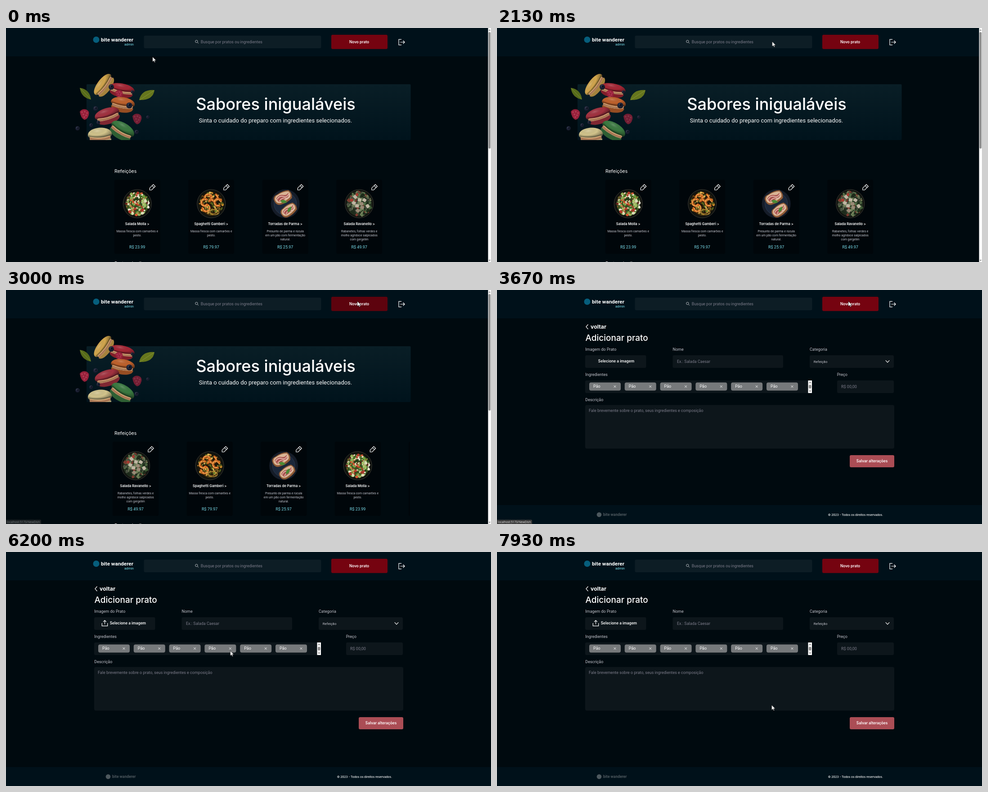
These frames come from a looping animation (1078x520 px, 8 s). An HTML page:

```html
<!DOCTYPE html>
<html lang="pt-BR">
<head>
<meta charset="utf-8">
<title>Novo prato</title>
<style>
  html, body { margin: 0; width: 100%; height: 100%; overflow: hidden; background: #000a0f; }
  svg { display: block; width: 1078px; height: 520px; font-family: Roboto, sans-serif; }
  .pop { font-family: Inter, sans-serif; font-weight: 500; fill: #fff; }
  .semi { font-weight: 600; }
  .mid { text-anchor: middle; }
  .line { fill: none; stroke: #fff; stroke-width: 1.2; }
  .label { font-size: 9px; fill: #c4c4cc; }
  .hint { font-size: 9px; fill: #7c7c8a; }
  .field { fill: #0d161b; }
  .bar { fill: #00111a; }
  .desc { font-size: 6.75px; fill: #c4c4cc; }
  .price { font-size: 9px; fill: #7ce0ee; }

  .a { animation: 8s step-end infinite; }
  .home { animation-name: home; }
  .form { animation-name: form; }
  .bare { animation-name: bare; }
  .icon { animation-name: icon; }
  .new { fill: #750310; animation-name: new; }
  .save { fill: #ab4d55; animation-name: save; }
  .status { animation: status 8s linear infinite; }
  .track { animation: track 8s linear infinite; }
  .cursor { animation: cursor 8s linear infinite; }

  @keyframes home { 0% { visibility: visible } 45.875%, 100% { visibility: hidden } }
  @keyframes form { 0% { visibility: hidden } 45.875%, 100% { visibility: visible } }
  @keyframes bare { 0% { opacity: 1 } 46.7%, 100% { opacity: 0 } }
  @keyframes icon { 0% { opacity: 0 } 46.7%, 100% { opacity: 1 } }
  @keyframes new {
    0% { fill: #750310 } 31.6% { fill: #5d030e } 45.875% { fill: #750310 }
    53.375% { fill: #5d030e } 54.5%, 100% { fill: #750310 }
  }
  @keyframes save { 0% { fill: #ab4d55 } 85.875% { fill: #9b444c } 96.6%, 100% { fill: #ab4d55 } }
  @keyframes status {
    0%, 35% { opacity: 0 } 37.5%, 44.12% { opacity: .5 }
    44.125%, 53.37% { opacity: 1 } 54.2%, 100% { opacity: 0 }
  }
  @keyframes track {
    0% { transform: translateX(-493.5px) }
    33.375% { transform: translateX(-493.5px); animation-timing-function: cubic-bezier(.25, 1, .5, 1) }
    39%, 100% { transform: none }
  }
  @keyframes cursor {
    0%, .875% { transform: translate(325.7px, 64px); animation-timing-function: ease-in-out }
    10.875%, 11.6% { transform: translate(519px, 30px); animation-timing-function: ease-in-out }
    15% { transform: translate(474px, 29px) }
    17.5%, 22.5% { transform: translate(491px, 30px); animation-timing-function: ease-in }
    26.625% { transform: translate(611px, 30px); animation-timing-function: ease-out }
    32.5%, 53.375% { transform: translate(781px, 25px); animation-timing-function: ease-in-out }
    62.5% { transform: translate(430px, 128px) }
    63.4% { transform: translate(428px, 130px); animation-timing-function: ease-in-out }
    74.1% { transform: translate(480px, 208px) }
    77.5% { transform: translate(498.5px, 219.5px); animation-timing-function: ease-in-out }
    85%, 86% { transform: translate(858px, 389px); animation-timing-function: ease-in-out }
    95.9% { transform: translate(795px, 379px) }
    99.125%, 100% { transform: translate(610.5px, 340px) }
  }
</style>
</head>
<body>
<svg viewBox="0 0 1078 520">
  <defs>
    <linearGradient id="banner" x2="0" y2="1">
      <stop stop-color="#091e26"/><stop offset="1" stop-color="#00131c"/>
    </linearGradient>
    <radialGradient id="shade" cx=".4" cy=".3" r=".75">
      <stop stop-color="#fff" stop-opacity=".2"/><stop offset=".5" stop-color="#000" stop-opacity="0"/>
      <stop offset="1" stop-color="#000" stop-opacity=".45"/>
    </radialGradient>
    <clipPath id="rail"><path d="M180 330H897.5V510H180Z"/></clipPath>
    <clipPath id="hero"><path d="M140 90H350V249H140Z"/></clipPath>
    <g id="macaron">
      <path d="M-25-5H25L24 7H-24Z" fill="#d8a878"/>
      <path d="M-24 0Q0 6 24 0V4Q0 9-24 4Z" fill="#4a1a16" opacity=".35"/>
      <path d="M-26 4Q0 10 26 4C27 19-27 19-26 4Z" fill="currentColor"/>
      <path d="M-26 4Q0 10 26 4C27 19-27 19-26 4Z" fill="#000" opacity=".22"/>
      <path d="M-28-3C-30-20 30-20 28-3Q26 1 22-1Q0 4-22-1Q-26 1-28-3Z" fill="currentColor"/>
      <path d="M-28-3C-30-20 30-20 28-3Q26 1 22-1Q0 4-22-1Q-26 1-28-3Z" fill="url(#shade)"/>
      <path d="M-27-3Q0 2 27-3" fill="none" stroke="#000" stroke-opacity=".25" stroke-width="1.5"/>
    </g>
    <g id="berry"><circle r="6" fill="#1d2338"/><circle r="6" fill="url(#shade)"/><circle cx="1" cy="-1" r="2" fill="#0b0e18"/></g>
    <g id="rasp">
      <path d="M-10-6Q-5-13 4-11Q12-8 10 1Q7 12 0 12Q-8 8-10-6Z" fill="#96203a"/>
      <g fill="#c24a60" opacity=".6"><circle cx="-5" cy="-5" r="2"/><circle cx="1" cy="-6" r="2"/><circle cx="6" cy="-3" r="2"/><circle cx="-2" r="2"/><circle cx="4" cy="2" r="2"/><circle cy="6" r="2"/></g>
    </g>
    <path id="pencil" class="line" d="M-6 1.7V6H-1.7L6.3-2L2-6.3ZM-.6-3.7L3.7 .6"/>
  </defs>

  <rect width="1078" height="520" fill="#000a0f"/>

  <g class="a home">
    <rect x="179" y="125" width="720.5" height="124" rx="2" fill="url(#banner)"/>
    <g clip-path="url(#hero)">
      <path d="M164 133Q186 136 189 159Q167 155 164 133Z" fill="#566a1a"/>
      <path d="M296 160Q301 136 330 138Q327 161 296 160Z" fill="#66761d"/>
      <path d="M165 134L188 158M297 160L329 139" stroke="#93a046" stroke-width=".7"/>
      <use href="#macaron" transform="translate(218.5 128) rotate(-53)" color="#d3a74e"/>
      <use href="#macaron" transform="translate(257 139) rotate(11)" color="#a52735"/>
      <use href="#rasp" transform="translate(251 147) scale(.8)"/>
      <use href="#macaron" transform="translate(259 171) rotate(9) scale(.95 1.1)" color="#c0622c"/>
      <use href="#macaron" transform="translate(226 196) rotate(-17) scale(1 1.15)" color="#a23240"/>
      <use href="#macaron" transform="translate(257 229) rotate(30) scale(1 1.2)" color="#3b7a41"/>
      <use href="#macaron" transform="translate(209 242) rotate(-4) scale(.95 1.3)" color="#d2c48c"/>
      <use href="#rasp" transform="translate(174 192)"/>
      <use href="#rasp" transform="translate(291 202)" opacity=".75"/>
      <g id="berries"></g>
    </g>
    <text class="pop mid" x="599.5" y="182" font-size="36.1">Sabores inigualáveis</text>
    <text class="mid" x="599" y="210" font-size="12.95" fill="#fff">Sinta o cuidado do preparo com ingredientes selecionados.</text>
    <text class="pop" x="241" y="321.5" font-size="10.6" style="font-weight:400">Refeições</text>
    <g clip-path="url(#rail)"><g class="track" id="cards"></g></g>
    <text class="pop" x="241" y="527" font-size="10.6" style="font-weight:400">Pratos do dia</text>
  </g>

  <g class="a form">
    <path class="line" d="M202.5 76.5L198 81.8L202.5 87"/>
    <text class="pop" x="208" y="85.7" font-size="12.3" style="font-weight:700">voltar</text>
    <text class="pop" x="196.5" y="112.7" font-size="19">Adicionar prato</text>
    <g class="label">
      <text x="196.3" y="135">Imagem do Prato</text><text x="390.5" y="135">Nome</text>
      <text x="695" y="135">Categoria</text><text x="196.3" y="191">Ingredientes</text>
      <text x="755.7" y="191">Preço</text><text x="196.3" y="246.5">Descrição</text>
    </g>
    <g class="field">
      <rect x="196" y="145" width="135.5" height="28" rx="3"/><rect x="390.5" y="145" width="245.5" height="28" rx="3"/>
      <rect x="695" y="145" width="187" height="28" rx="3"/><rect x="196" y="201" width="504" height="28" rx="3"/>
      <rect x="756" y="201" width="126" height="28" rx="3"/><rect x="196" y="255.5" width="687" height="97" rx="4"/>
    </g>
    <text class="pop mid semi a bare" x="265" y="160.5" font-size="8.3">Selecione a imagem</text>
    <g class="a icon">
      <path class="line" d="M213.3 158V164.3H225.7V158M219.5 160.5V152M216 155.3L219.5 151.8L223 155.3"/>
      <text class="pop semi" x="230.7" y="160.5" font-size="8.3">Selecione a imagem</text>
    </g>
    <g class="hint">
      <text x="400" y="161.5">Ex.: Salada Caesar</text><text x="765" y="217.7">R$ 00,00</text>
      <text x="204" y="270.7">Fale brevemente sobre o prato, seus ingredientes e composição</text>
    </g>
    <text x="703.7" y="161.5" font-size="7.9" fill="#c4c4cc">Refeição</text>
    <path class="line" d="M863.7 156.3L868 160.8L872.3 156.3"/>
    <g id="tags"></g>
    <rect x="691.5" y="201" width="8.5" height="28" fill="#fcfcfc"/>
    <rect x="693" y="210.5" width="5.5" height="8.5" rx="2.7" fill="#8b8b8b"/>
    <path d="M693.3 207L695.8 203.5L698.3 207ZM693.3 223.3L695.8 226.8L698.3 223.3Z" fill="#8b8b8b"/>
    <rect class="a save" x="784" y="367" width="99" height="27" rx="3"/>
    <text class="pop mid semi" x="833.5" y="383.4" font-size="8.3">Salvar alterações</text>
    <rect class="bar" y="478" width="1078" height="42"/>
    <circle cx="227" cy="499.2" r="5.3" fill="#4d585e"/>
    <text x="236" y="502" font-size="8.5" font-weight="700" fill="#4d585e">bite wanderer</text>
    <text class="pop" x="735.7" y="501.5" font-size="6.5">© 2023 - Todos os direitos reservados.</text>
  </g>

  <rect class="bar" width="1078" height="63"/>
  <circle cx="200.5" cy="26" r="7" fill="#065e7c"/>
  <text x="211" y="29.6" font-size="11.7" font-weight="700" fill="#fff">bite wanderer</text>
  <text x="284" y="38.5" font-size="7.6" text-anchor="end" fill="#7ce0ee">admin</text>
  <rect x="306.5" y="17" width="394" height="28" rx="3" fill="#0d1d25"/>
  <g class="line" style="stroke:#b8bcc0;stroke-width:1"><circle cx="423.4" cy="29.8" r="2.7"/><path d="M425.4 31.8L428 34.3"/></g>
  <text class="hint" x="432.8" y="34.3">Busque por pratos ou ingredientes</text>
  <rect class="a new" x="723" y="15" width="125" height="31.7" rx="3"/>
  <text class="pop mid semi" x="785" y="33.8" font-size="8.3">Novo prato</text>
  <path class="line" d="M879 25.3H873V37.7H879M876.5 31.5H886M882.6 28L886 31.5L882.6 35"/>

  <g class="a home">
    <rect x="1071.5" width="6.5" height="520" fill="#fcfcfc"/>
    <rect x="1072.5" y="9" width="4.5" height="259" rx="2.2" fill="#8b8b8b"/>
    <path d="M1072.7 6L1074.8 2.8L1076.9 6ZM1072.7 515L1074.8 518.2L1076.9 515Z" fill="#8b8b8b"/>
  </g>

  <g class="status">
    <path d="M0 510.5H76Q78 510.5 78 512.5V520H0Z" fill="#3b3b3b"/>
    <text x="2" y="518" font-size="6.5" font-family="Open Sans, sans-serif" fill="#e4e4e4">localhost:5173/NewDish</text>
  </g>
  <path class="cursor" d="M0 0V11.2L2.6 8.8L4.4 12.6L6.1 11.9L4.4 8.2H7.8Z" fill="#fff" stroke="#000" stroke-width=".6"/>
</svg>
<script>
  const put = (id, html) => document.getElementById(id).innerHTML = html;
  const many = (n, f) => Array.from({ length: n }, (_, i) => f(i)).join('');

  function random(seed) {
    return () => (seed = seed * 16807 % 2147483647) / 2147483647;
  }

  const disc = (r, fill) => `<circle r="${r}" fill="${fill}"/>`;

  // Scattered leaves and bits inside a bowl
  function bits(seed, n, reach, size, colors) {
    const rnd = random(seed);
    return many(n, () => {
      const a = rnd() * 6.28, d = reach * Math.sqrt(rnd());
      const rx = size * (.5 + rnd()), ry = rx * (.4 + rnd() * .5);
      const fill = colors[Math.floor(rnd() * colors.length)];
      return `<ellipse rx="${rx.toFixed(1)}" ry="${ry.toFixed(1)}" fill="${fill}"
        transform="translate(${(d * Math.cos(a)).toFixed(1)} ${(d * Math.sin(a)).toFixed(1)}) rotate(${Math.round(rnd() * 180)})"/>`;
    });
  }

  const bowl = '<circle r="31.5" fill="#11130f" stroke="#4b4a40" stroke-width=".8"/>';

  const molla = bowl + disc(26, '#35511f') +
    bits(71, 230, 26, 2.6, ['#3f6b22', '#6f9a3a', '#24401a', '#8fae58', '#a9c46c', '#d9dcb4', '#ece6d4', '#b5382a', '#d2562f', '#5b1f1a']);

  const ravanello = bowl + disc(28, '#222d1f') +
    bits(913, 170, 27, 3, ['#3d5a35', '#587049', '#1d2b1a', '#71805a', '#4a5142', '#7d3a30']) +
    many(9, i => `<rect x="-4" y="-3.5" width="8" height="7" rx="1" fill="${i % 3 ? '#bfb5a2' : '#9a8a76'}"
      transform="rotate(${i * 137}) translate(${5 + i * 1.8} 0) rotate(${i * 50})"/>`) +
    `<g fill="#a53c31"><circle cx="-17" cy="-8" r="3.5"/><circle cx="-5" cy="-20" r="3"/></g>`;

  const shrimp = `<path d="M-6 5A7.5 7.5 0 1 1 6 5" stroke="#c8631f" stroke-width="5"/>
    <path d="M-6 3.5A7 7 0 1 1 5 3" stroke="#eda04e" stroke-width="2.2"/>
    <path d="M-7-1L-3-2M-3-7L-2-3M4-6L2-3M7 0L3-1" stroke="#7d3712" stroke-width=".8"/>`;
  const gamberi = bowl + disc(27, '#1d170b') + bits(37, 150, 26, 2.4, ['#c58b2c', '#6b4513', '#e0b455', '#2a1c0b', '#55651f', '#17130b']) +
    many(7, i => `<ellipse cx="${i % 3 * 3 + 2}" cy="18" rx="${4 + i * 1.4}" ry="${2 + i * .8}" fill="none" stroke="${i % 2 ? '#d6aa45' : '#7b5a1d'}" stroke-width="1" transform="rotate(${i * 9 - 40})"/>`) +
    many(5, i => `<g transform="rotate(${i * 52 + 140}) translate(15 0) rotate(${i * 75})" fill="none" stroke-linecap="round">${shrimp}</g>`) +
    bits(5, 14, 22, 1.5, ['#5f8a2d', '#8aa845']);

  const toast = `<path d="M-17 0Q-18-10-8-10Q4-13 15-9Q20-1 15 7Q4 12-9 10Q-17 8-17 0Z" fill="#8f5a35"/>
    <path d="M-15-2Q-14-9-6-9Q5-11 14-7Q17-1 13 4Q3 8-8 7Q-15 5-15-2Z" fill="#d9b596"/>
    <path d="M-12-4Q-4-9 2-5T13-5Q13 2 6 3T-10 4Z" fill="#a8524f"/>
    <path d="M-11-2Q-4-7 2-2T13-3M-9 3Q-2-2 4 2T11 2" fill="none" stroke="#e3b9ab" stroke-width="1.5"/>`;
  const leaf = '<path d="M-7 1Q0-7 8-1Q1 7-7 1Z" fill="#4c8a35"/>';
  const parma = disc(32, '#151c28') + '<circle r="25" fill="#1b273a" stroke="#2c3a50"/>' +
    `<g transform="translate(-5 -13) rotate(-24) scale(1.2)">${toast}</g>
     <g transform="translate(8 15) rotate(-34) scale(1.1)">${toast}</g>
     <g transform="translate(-4 -5) rotate(20)">${leaf}</g><g transform="translate(9 13) rotate(-50)">${leaf}</g>`;

  const M = ['Salada Molla', '23.99', molla, 'Massa fresca com camarões e', 'pesto.'];
  const G = ['Spaghetti Gamberi', '79.97', gamberi, 'Massa fresca com camarões e', 'pesto.'];
  const P = ['Torradas de Parma', '25.97', parma, 'Presunto de parma e rúcula', 'em um pão com fermentação', 'natural.'];
  const R = ['Salada Ravanello', '49.97', ravanello, 'Rabanetes, folhas verdes e', 'molho agridoce salpicados', 'com gergelim'];

  put('cards', [R, G, P, M, G, P, R].map(([name, price, dish, ...lines], i) => `
    <g transform="translate(${291.7 + i * 164.5} 0)" class="mid">
      <rect x="-51" y="337" width="102" height="165" rx="4" fill="#00060a"/>
      <g transform="translate(0 390.5)">${dish}</g>
      <use href="#pencil" x="33.7" y="354"/>
      <text class="pop semi" y="437.5" font-size="7.6">${name} &gt;</text>
      ${many(lines.length, k => `<text class="desc" y="${454 + k * 9.1}">${lines[k]}</text>`)}
      <text class="price" y="490">R$ ${price}</text>
    </g>`).join(''));

  put('tags', many(6, i => `
    <g transform="translate(${205 + i * 78.8} 205.5)">
      <rect width="70" height="18" rx="4" fill="#76797b"/>
      <text x="9" y="11.8" font-size="9" fill="#fff">Pão</text>
      <path class="line" style="stroke-width:.9" d="M54.7 6.7L59.3 11.3M59.3 6.7L54.7 11.3"/>
    </g>`));

  put('berries', [[234, 131, 1], [274, 172, 1.1], [199, 179, .9], [290, 231, .8], [159, 223, .8],
    [189, 216, .7], [315, 198, .6], [281, 142, .6], [205, 210, .7]]
    .map(([x, y, s]) => `<use href="#berry" transform="translate(${x} ${y}) scale(${s})"/>`).join(''));
</script>
</body>
</html>
```
